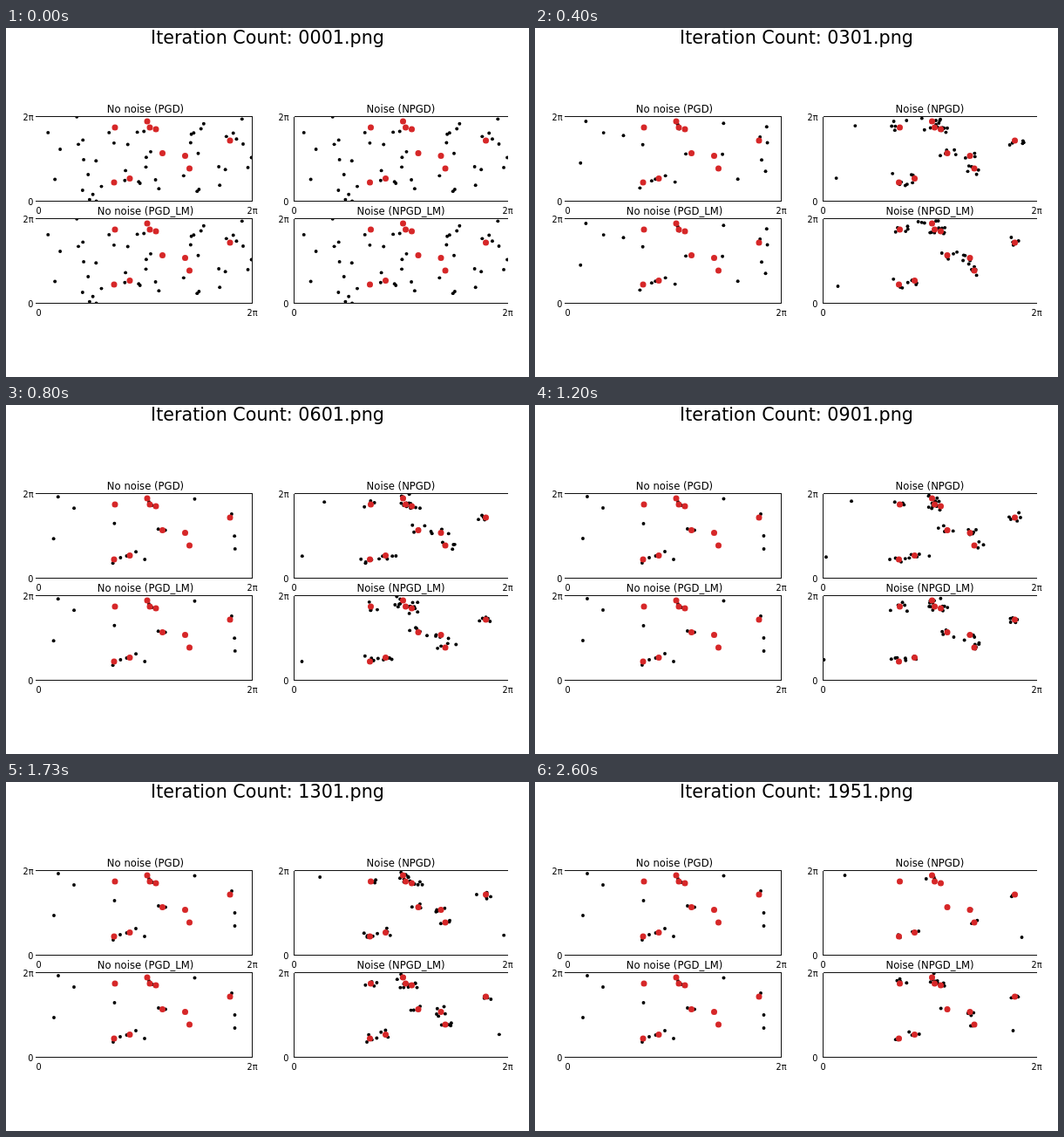
Recreate the animation shown at these times as an HTML page with a canvas. Size 600 px wide and 400 px high, loop 2.67 s.

```html
<!DOCTYPE html>
<html lang="en">
<head>
<meta charset="utf-8">
<title>Particle descent</title>
<style>
  html, body { margin: 0; width: 100%; height: 100%; overflow: hidden; background: #fff; }
  canvas, svg { position: absolute; left: 0; top: 0; width: 600px; height: 400px; }
  text { font-family: "DejaVu Sans", sans-serif; fill: #000; text-anchor: middle; }
  .count { font-size: 20.7px; }
  .name { font-size: 11.65px; }
  .tick { font-size: 9.72px; }
  .end { text-anchor: end; }
  path { fill: none; stroke: #111; stroke-width: 1; shape-rendering: crispEdges; }
</style>
</head>
<body>
<canvas width="600" height="400"></canvas>
<svg viewBox="0 0 600 400"><text class="count" id="count" x="300" y="18">Iteration Count: 0001.png</text></svg>
<script>
const LOOP = 2670, STEPS = 40;
const BOX = { x: 37.5, y: 101.5, w: 245, h: 97 };

// strays: first and last place of particles far from any spike
const panels = [
  { dx: 0, dy: 0, name: 'No noise (PGD)' },
  { dx: 293.5, dy: 0, name: 'Noise (NPGD)', seed: 11, strays: [[76, 113, 62, 107], [58, 171, 20, 178]] },
  { dx: 0, dy: 117, name: 'No noise (PGD_LM)' },
  { dx: 293.5, dy: 117, name: 'Noise (NPGD_LM)', seed: 29, strays: [[62, 181, 10, 168]] }
];
const spikes = [[125, 114], [162, 107], [165, 114], [172, 116], [257, 129],
  [179.5, 143.5], [205.5, 146.5], [210.5, 161], [142, 172.5], [124, 177]];
// Where the lasting noise-free particles settle
const rests = [[60, 105], [78, 118], [55, 153], [124.5, 136], [123, 181], [131, 175], [138.5, 173],
  [149, 168], [159, 177], [216.5, 107.5], [259, 125], [262.5, 150], [262.5, 165],
  [175, 142], [183, 143.5], [164, 111], [168, 115]];

const mix = (a, b, u) => a + (b - a) * u;
const mixPoint = (a, b, u) => [mix(a[0], b[0], u), mix(a[1], b[1], u)];
const dist = (a, b) => Math.hypot(a[0] - b[0], a[1] - b[1]);
const nearest = p => spikes.reduce((a, b) => dist(p, b) < dist(p, a) ? b : a);
const bounce = y => BOX.y + Math.abs(y - BOX.y);

function random(seed) {
  return () => {
    seed = (seed * 1664525 + 1013904223) >>> 0;
    return seed / 4294967296;
  };
}

const rnd = random(7);
const lasting = rests.map(rest => ({
  start: [rest[0] + (rnd() - 0.5) * 45, bounce(rest[1] + (rnd() - 0.5) * 36)], rest
}));
const pruned = Array.from({ length: 32 }, () => ({
  start: [BOX.x + rnd() * BOX.w, BOX.y + rnd() * BOX.h], end: 1 + 7 * rnd() ** 2
}));
const starts = [...lasting, ...pruned].map(p => p.start);
const drift = (p, k) => mixPoint(p, nearest(p), k * 0.06);

const calmDots = k => [
  ...lasting.map(p => mixPoint(p.rest, p.start, Math.exp(-k / 3))),
  ...pruned.filter(p => k < p.end).map(p => drift(p.start, k))
];

// Each noisy particle leaves for a spike, jitters around it, and may be pruned later
function noisyTracks(seed) {
  const rnd = random(seed), gauss = () => rnd() + rnd() + rnd() + rnd() - 2;
  return starts.map((start, i) => {
    const home = spikes[i % spikes.length], join = 1 + rnd() * 4, end = 22 + rnd() * 28;
    let nx = 0, ny = 0;
    return Array.from({ length: STEPS }, (_, k) => {
      nx = nx * 0.6 + gauss() * 10;
      ny = ny * 0.6 + gauss() * 5;
      if (k < join) return drift(start, k);
      const heat = 1 - 0.5 * k / STEPS;
      return k < end ? [home[0] + nx * heat, bounce(home[1] + ny * heat)] : home;
    });
  });
}

function strayAt([x0, y0, x1, y1], k) {
  const [x, y] = mixPoint([x0, y0], [x1, y1], k / (STEPS - 1));
  return [x < BOX.x ? x + BOX.w : x, y];
}

const ctx = document.querySelector('canvas').getContext('2d');
const svg = document.querySelector('svg');
const count = document.getElementById('count');

function add(tag, attrs, text = '') {
  const el = document.createElementNS(svg.namespaceURI, tag);
  for (const key in attrs) el.setAttribute(key, attrs[key]);
  el.textContent = text;
  svg.append(el);
}

for (const p of panels) {
  const l = Math.floor(BOX.x + p.dx - 0.5) + 0.5, r = l + BOX.w;
  const t = BOX.y + p.dy, b = t + BOX.h;
  // Only the spine between the two columns is visible
  const left = p.dx ? l : l - 4, spine = p.dx ? l : r;
  add('path', { d: `M${left} ${t}H${r}M${left} ${b}H${r}M${spine} ${t}V${b}` });
  add('text', { class: 'name', x: (l + r) / 2, y: t - 5 }, p.name);
  add('text', { class: 'tick end', x: l - 6, y: t + 4 }, '2π');
  add('text', { class: 'tick end', x: l - 6, y: b + 4 }, '0');
  add('text', { class: 'tick', x: l, y: b + 14.5 }, '0');
  add('text', { class: 'tick', x: r, y: b + 14.5 }, '2π');
  if (p.seed) p.tracks = noisyTracks(p.seed);
}

function plot(dots, radius, color) {
  ctx.fillStyle = color;
  for (const [x, y] of dots) {
    ctx.beginPath();
    ctx.arc(x, y, radius, 0, 7);
    ctx.fill();
  }
}

function draw(k) {
  count.textContent = `Iteration Count: ${String(k * 50 + 1).padStart(4, '0')}.png`;
  ctx.clearRect(0, 0, 600, 400);
  for (const p of panels) {
    const dots = !p.seed || k === 0 ? calmDots(k)
      : [...p.tracks.map(track => track[k]), ...p.strays.map(s => strayAt(s, k))];
    ctx.save();
    ctx.translate(p.dx, p.dy);
    ctx.beginPath();
    ctx.rect(BOX.x, BOX.y, BOX.w, BOX.h);
    ctx.clip();
    plot(dots, 1.95, '#000');
    plot(spikes, 3.5, '#d62728');
    ctx.restore();
  }
}

// Steps change on a 10 ms grid
const stepTime = k => Math.round(k * 20 / 3) * 10;
let shown = -1;
function tick() {
  const t = performance.now() % LOOP;
  let k = STEPS - 1;
  while (k > 0 && stepTime(k) > t) k--;
  if (k !== shown) draw(shown = k);
  requestAnimationFrame(tick);
}
tick();
</script>
</body>
</html>
```
